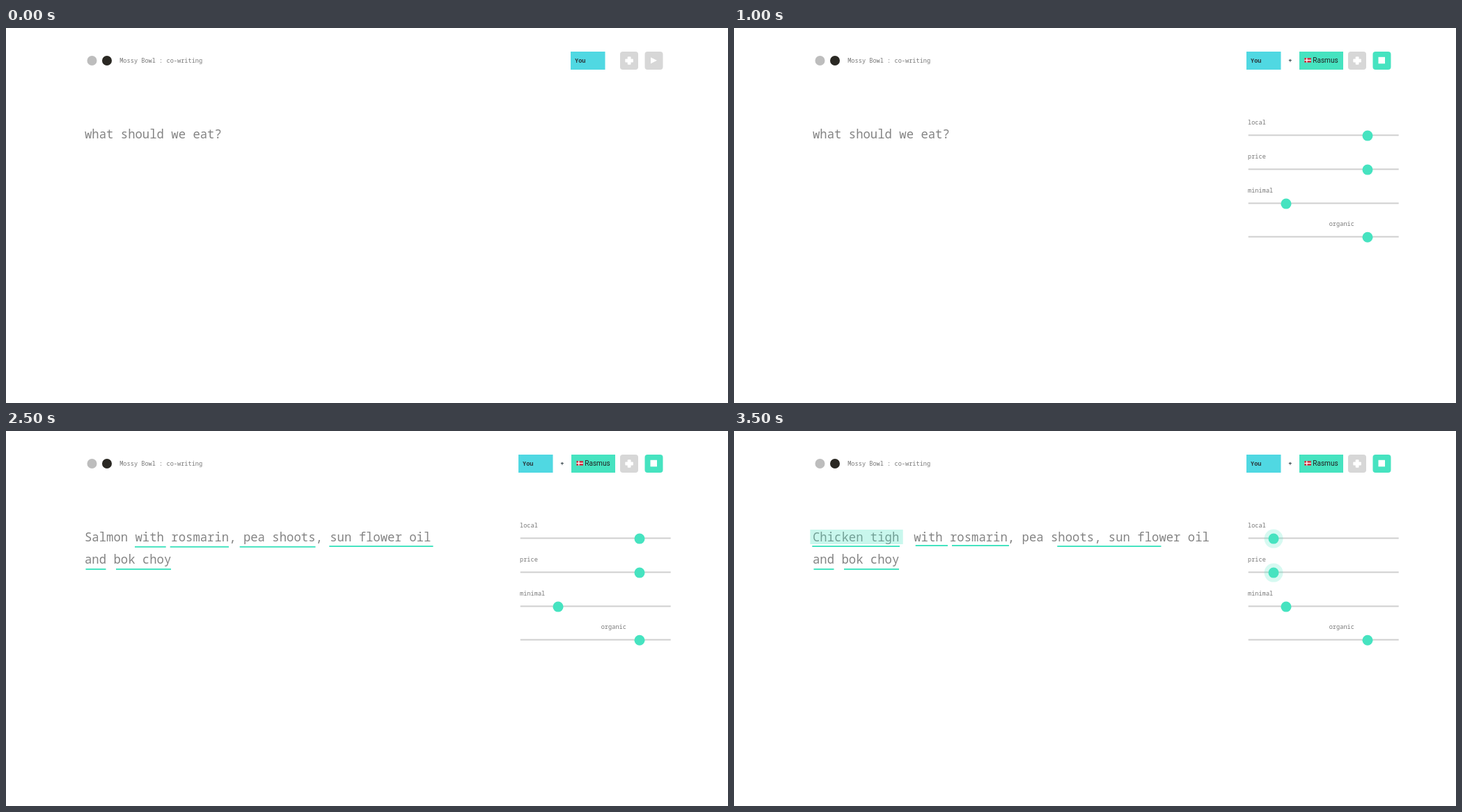
Recreate the animation shown at these times as an HTML page. Size 1037x540 px, loop 4000 ms.

```html
<!DOCTYPE html>
<html lang="en">
<head>
<meta charset="utf-8">
<title>Co-writing</title>
<style>
  html, body { margin: 0; width: 100%; height: 100%; overflow: hidden; background: #fff; }
  svg { display: block; width: 100%; height: 100%; }
  text { white-space: pre; }
  .mono { font-family: "Roboto Mono", "Noto Sans Mono", "DejaVu Sans Mono", monospace; font-size: 8.64px; fill: #777; }
  .big { font-size: 17.28px; font-weight: 500; fill: #848484; }
  .dark { font-weight: 600; fill: #2c3b40; }
  .name { font-family: Roboto, Inter, sans-serif; font-size: 8.6px; fill: #222; }
  .tag { font-size: 10.1px; }
</style>
</head>
<body>
<svg id="stage" viewBox="0 0 1037 540"></svg>
<script>
const STEP = 500, LOOP = 4000;
const MINT = '#46e3c0', CYAN = '#50d8e2', GREY = '#d7d7d7';
const CHAR = 10.37, LEFT = 113, LINE1 = 159, LINE2 = 191;
const stage = document.getElementById('stage');

const rect = (x, y, w, h, fill, extra = '') =>
  `<rect x="${x}" y="${y}" width="${w}" height="${h}" fill="${fill}" ${extra}/>`;
const circle = (x, y, r, fill, extra = '') =>
  `<circle cx="${x}" cy="${y}" r="${r}" fill="${fill}" ${extra}/>`;
const text = (x, y, str, cls = 'mono') => `<text x="${x}" y="${y}" class="${cls}">${str}</text>`;
const big = (col, y, str) => text(LEFT + col * CHAR, y, str, 'mono big');
const under = (x1, x2, y) => rect(x1, y - 1, x2 - x1, 2, MINT);
const mark = (x1, x2, y) => rect(x1, y, x2 - x1, 21, MINT, 'opacity=".29"');

// Flags are drawn on an 8 by 5.4 field
const flags = {
  cross: rect(0, 0, 8, 5.4, '#d02a3c') + rect(2.3, 0, 1.1, 5.4, '#fff') + rect(0, 2.15, 8, 1.1, '#fff'),
  disc: rect(0, 0, 8, 5.4, '#f6f3ee') + circle(4, 2.7, 1.4, '#c92b3a'),
  bands: rect(0, 0, 8, 2.7, '#f2cd37') + rect(0, 2.7, 8, 1.35, '#2d4c96') + rect(0, 4.05, 8, 1.35, '#c5283a'),
  stripes: rect(0, 0, 2.7, 5.4, '#168a4b') + rect(2.7, 0, 2.6, 5.4, '#f6f6f6') + rect(5.3, 0, 2.7, 5.4, '#cf3340'),
  star: rect(0, 0, 8, 5.4, '#cf2b35') + circle(1.9, 1.8, .8, '#e8c040')
};
const flag = (kind, x, y, scale = 1) =>
  `<g transform="translate(${x} ${y}) scale(${scale})">${flags[kind]}</g>`;

const people = [
  ['Rasmus', 'cross', MINT],
  ['Aya', 'disc', '#ebe148'],
  ['Santiago', 'bands', '#d870ee'],
  ['Margherita', 'stripes', '#f8a700'],
  ['Feng', 'star', '#48dae4']
];

function header() {
  return circle(123.5, 47, 7, '#bdbdbd') + circle(145, 47, 7, '#2a2823') +
    text(163.2, 49.7, 'Mossy Bowl : co-writing') +
    rect(882, 34, 26, 26, GREY, 'rx="4"') +
    rect(889.3, 44.6, 11.6, 4.8, '#fff', 'rx="1"') +
    rect(892.7, 41.2, 4.8, 11.6, '#fff', 'rx="1"');
}

const you = x => rect(x, 34, 49.5, 26, CYAN) + text(x + 6, 50.3, 'You', 'mono dark');

const solo = () => you(811) + rect(917.5, 34, 26, 26, GREY, 'rx="4"') +
  '<path d="M926 42.3L935 46.8L926 51.3Z" fill="#fff"/>';

const menu = () => people.map(([name, kind, fill], i) => {
  const y = 64.4 + i * 24.5;
  return rect(811.2, y, 96.6, 24.6, fill) + flag(kind, 820, y + 9.2) + text(830.7, y + 15.3, name, 'name');
}).join('');

const pair = () => you(736) + text(796.2, 50.2, '+', 'mono dark') +
  rect(812, 34, 63, 26, MINT) + flag('cross', 819.3, 43.2, 1.2) + text(831.2, 50.4, people[0][0], 'name tag') +
  rect(917.5, 34, 26, 26, MINT, 'rx="4"') + rect(925.5, 41.8, 9.5, 9.5, '#fff');

function slider(label, labelX, y, knobX, active) {
  const halo = active ? circle(knobX, y + .7, 13.5, MINT, 'opacity=".22"') : '';
  return text(labelX, y - 15.6, label) + rect(738.7, y - 1, 216, 2, '#cfcfcf') +
    halo + circle(knobX, y + .7, 7.5, MINT);
}

function sliders(step) {
  const local = step >= 6, price = step >= 7;
  return slider('local', 738, 154.4, local ? 775 : 910, local) +
    slider('price', 738, 203.4, price ? 775 : 910, price) +
    slider('minimal', 738, 252.4, 793, false) +
    slider('organic', 854.7, 300.6, 910, false);
}

const tail = () => big(0, LINE2, 'and bok choy') + under(114.5, 143.5, 199) + under(158, 237, 199);

function recipe(step) {
  if (step < 3) return big(0, LINE1, 'what should we eat?');
  if (step === 3) return big(0, LINE1, 'Salmon');
  if (step === 4) return big(0, LINE1, 'Salmon with') + under(185, 229.7, 166.8);
  if (step < 7) {
    const marks = step === 6 ? mark(236.2, 322, 142) + mark(465, 613, 142) + mark(155, 240.3, 174.3) : '';
    return big(0, LINE1, 'Salmon with rosmarin, pea shoots, sun flower oil') + tail() +
      under(185, 229.7, 166.8) + under(235.7, 320, 166.8) + under(335.7, 444.5, 166.8) +
      under(464.3, 613.5, 166) + marks;
  }
  return big(0, LINE1, 'Chicken tigh') + big(14, LINE1, 'with rosmarin, pea shoots, sun flower oil') + tail() +
    under(112.3, 238, 166) + under(260.7, 307, 165) + under(313, 395, 165) +
    under(464.3, 613.5, 166) + mark(109.4, 242.7, 142);
}

function scene(step) {
  const side = step < 2 ? solo() + (step === 1 ? menu() : '') : pair() + sliders(step);
  return header() + side + recipe(step);
}

let shown = -1;
const start = performance.now();
function tick() {
  const step = Math.floor((performance.now() - start) % LOOP / STEP);
  if (step !== shown) stage.innerHTML = scene(shown = step);
  requestAnimationFrame(tick);
}
tick();
</script>
</body>
</html>
```
